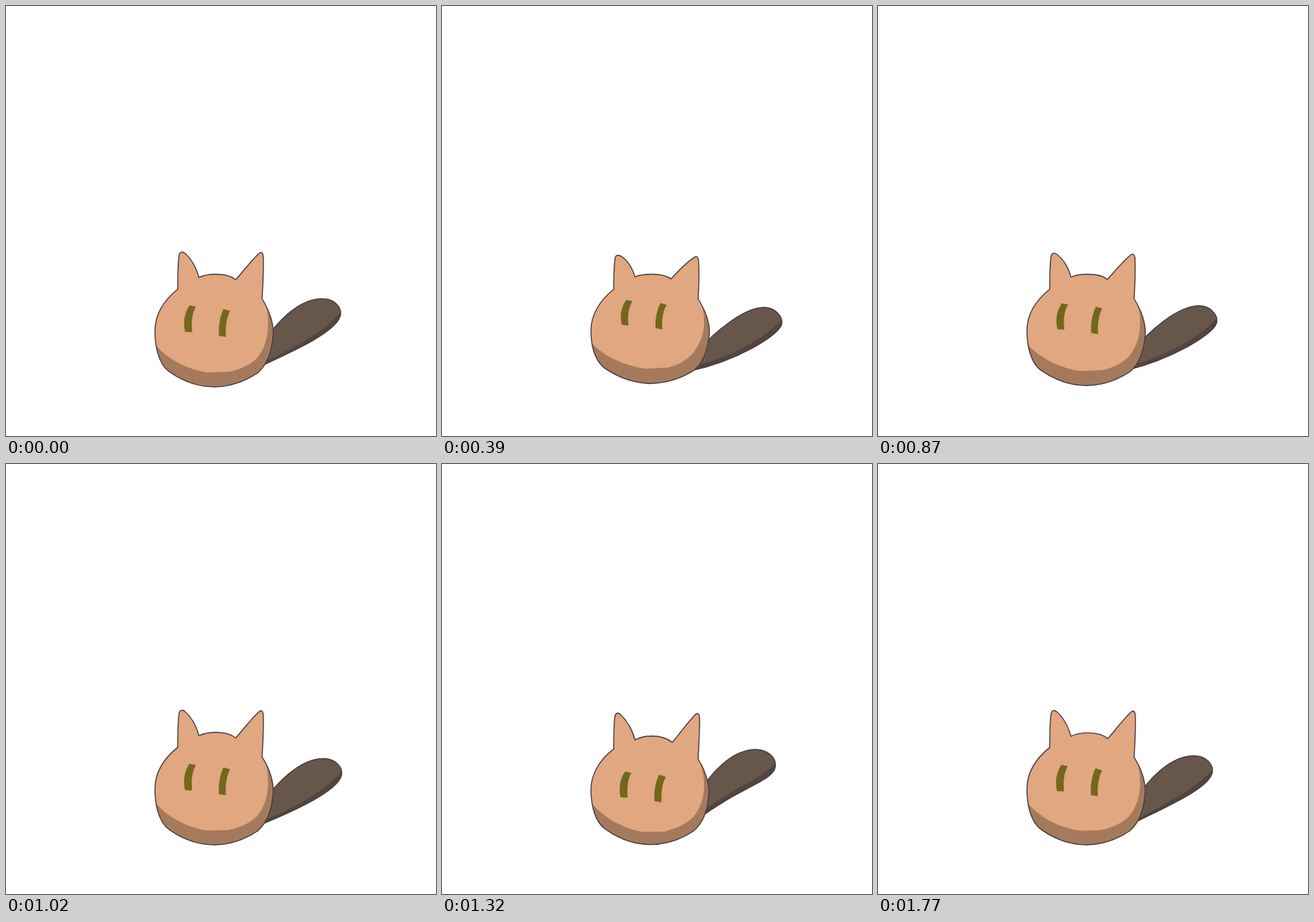
An HTML page without scripts that plays this animation: 586 by 586 pixels, repeating every 1.8 s.

```html
<!DOCTYPE html>
<html lang="en">
<head>
<meta charset="utf-8">
<title>Breathing cat</title>
<style>
html, body { margin: 0; width: 100%; height: 100%; overflow: hidden; background: #fff; }
svg { display: block; width: 100%; height: 100%; }

/* Each part carries three poses: rest, up, down */
.pose { d: var(--rest); animation: breathe 1.8s infinite; }
.sway { d: var(--rest); animation: sway 1.8s infinite; }

@keyframes breathe {
  0%     { d: var(--rest); animation-timing-function: cubic-bezier(.25, .55, .55, 1); }
  27.2%  { d: var(--up);   animation-timing-function: cubic-bezier(.35, .08, .7, .55); }
  55.8%  { d: var(--rest); animation-timing-function: cubic-bezier(.4, .5, .7, 1); }
  83.3%  { d: var(--down); animation-timing-function: cubic-bezier(.4, 0, .75, .65); }
  100%   { d: var(--rest); }
}
@keyframes sway {
  0%     { d: var(--rest); animation-timing-function: cubic-bezier(.4, .4, .8, .95); }
  33.3%  { d: var(--up);   animation-timing-function: cubic-bezier(.35, 0, .65, .55); }
  59.7%  { d: var(--rest); animation-timing-function: cubic-bezier(.3, .5, .6, 1); }
  82.2%  { d: var(--down); animation-timing-function: cubic-bezier(.45, 0, .7, .7); }
  100%   { d: var(--rest); }
}

.body {
  --rest: path("M234 386C234 372 234 352 236 339C237 335 240 334 244 337C252 344 259 356 263 370C270 366.500 278 365.500 286 365.500C296 365.500 306 367 313 373C324 361 334 347 345 337C348 335 350 336 350.500 341C351.500 360 350 380 349 399C357 412 364.300 430 364.300 446C363 468 357 488 343 500C325 512 305 519 284 519C262 519 240 511 222 498C208 488 203 464 203 443C203 422 214 402 234 386Z");
  --up: path("M234 386C234 372 234 356 236 343C237 339.500 240 339 244 341C252 346 260 357 263 369C270 366 278 365.500 286 365.500C296 365.500 306 367 312 372C322 361 332 350 344 342.500C347 340.700 349 342 349.500 347C351 364 350 382 349 399C357 412 364.500 429 364.500 444C363 466 358 484 344 496C325 508 305 514 284 514.300C262 514 240 506 221 493C208 482 203 462 203 442C203 422 214 402 234 386Z");
  --down: path("M234 389C234 375 234 357 235.500 345C236.500 340.500 240 339 243.500 343C252 351 259 363 263 377.500C270 373.500 278 372 286 372C296 372 306 374 314 381C325 368 335 353 346 342C349 340 350.500 341 351 346C351.500 364 350 384 349 403C357 415 363.500 432 363.500 447C363 469 357 488 343 500C325 512 305 518.500 284 518.500C262 518.500 240 510 222 497C208 487 203 464 203 444C203 424 214 404 234 389Z");
}
.shade {
  --rest: path("M200 457C212 474 238 494 275 499.500L304 498.500C320 495 333 489 342 480C354 466 358 446 357 430C357 420 356 412 352 404L380 400L380 530L200 530Z");
  --up: path("M200 454C212 471 238 488 277 494L308 492.500C322 489 333 483 342 473C353 459 358 444 357 428C357 420 356 412 352 404L380 400L380 530L200 530Z");
  --down: path("M200 457C212 474 238 496 275 502L303 501.500C320 497 333 491 342 482C354 468 358 450 357 437C357 427 355 419 352 410L380 400L380 530L200 530Z");
}
.eyes {
  --rest: path("M250 408L258.700 409.700C253 420 252.500 432 253.700 444.500L244 444C241 430 243.500 418 250 408ZM296.500 413L305.500 415.500C300 426 299 438 299.700 451L290.300 449.500C289.500 436 291.500 423 296.500 413Z");
  --up: path("M251 400.300L259.700 402C253.500 412 253 423 254.200 435L245 434.300C242 421 244.500 410 251 400.300ZM298 404.500L306.200 407C300.500 417 299.500 428 300.200 440.500L291 438.700C290.500 426 292.500 414 298 404.500Z");
  --down: path("M249 422L258 423.500C252.500 433 252 445 252.700 457.300L243 456.700C240.500 444 242.500 432 249 422ZM295.700 426L305 429C299.500 439 298.500 451 299 463.500L289.300 462C288.700 449 290.500 436 295.700 426Z");
}
.tail {
  --rest: path("M352 460C366 432 400 398 432 399C447 399 457 410 456 420C454 442 397 468 340 494Z");
  --up: path("M350 470C368 457 411 417 441 415.500C456 415.500 467 427 466 437C466 450 400 492 335 499Z");
  --down: path("M350 450C362 421 394 388 426 387C442 387 455 397 454 410C453 430 408 434 345 486Z");
}
.under {
  --rest: path("M458 414C440 440 395 465 340 491L340 530L480 500Z");
  --up: path("M468 429C450 450 400 484 335 493L335 530L490 500Z");
  --down: path("M457 403C434 428 402 432 345 480L345 530L480 500Z");
}
.line { fill: none; stroke: #463c42; stroke-width: 1.4; stroke-linejoin: round; }
</style>
</head>
<body>
<svg viewBox="0 0 586 586">
  <clipPath id="in-tail"><path class="sway tail"/></clipPath>
  <clipPath id="in-body"><path class="pose body"/></clipPath>

  <path class="sway tail" fill="#67574b"/>
  <g clip-path="url(#in-tail)"><path class="sway under" fill="#54443f"/></g>
  <path class="sway tail line"/>

  <path class="pose body" fill="#e0a780"/>
  <g clip-path="url(#in-body)"><path class="pose shade" fill="#a57a5c"/></g>
  <path class="pose body line"/>
  <path class="pose eyes" fill="#73671b"/>
</svg>
</body>
</html>
```
